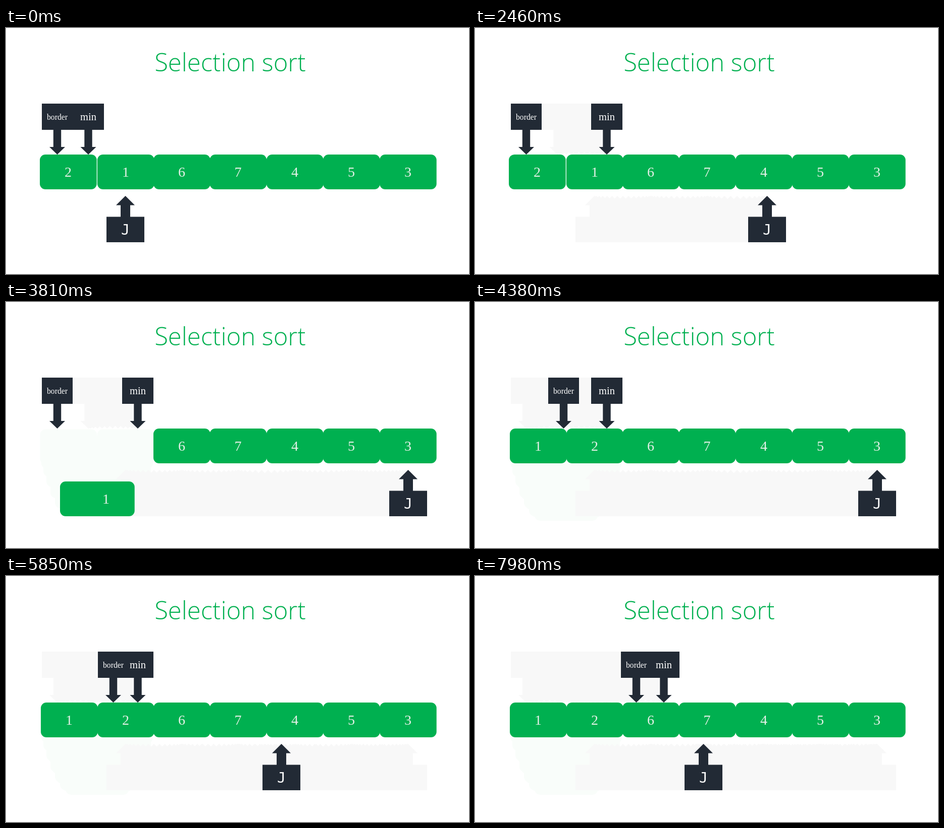
Animation of 917 by 488 pixels, one loop 8 s. Source, as an HTML page:

```html
<!DOCTYPE html>
<html lang="en">
<head>
<meta charset="utf-8">
<title>Selection sort</title>
<style>
  html, body { margin: 0; width: 100%; height: 100%; overflow: hidden; background: #fff; }
  svg { display: block; width: 100vw; height: 100vh; }
  text { text-anchor: middle; }
  .title { font: 300 49px "Open Sans", "Noto Sans", sans-serif; fill: #00b050; }
  .cell rect { fill: #00b050; }
  .cell text { font: 28px "Liberation Serif", "Times New Roman", serif; fill: #e5f1e9; }
  .label path { fill: #222a35; }
  .label text { font-family: "Liberation Serif", "Times New Roman", serif; fill: #fff; }
  #j text { font-family: "DejaVu Sans Mono", monospace; }
</style>
</head>
<body>
<svg id="stage" viewBox="0 0 917 488" xmlns="http://www.w3.org/2000/svg">
  <text class="title" x="444" y="86">Selection sort</text>
  <path id="cellTrail" fill="#f9fdfa"/>
  <path id="labelTrail" fill="#f8f8f8"/>
  <g id="cells"></g>
  <g id="min" class="label"><path/><text x="31" y="183" font-size="20.5">min</text></g>
  <g id="border" class="label"><path/><text x="30.5" y="182" font-size="15.7">border</text></g>
  <g id="j" class="label"><path/><text x="37.5" y="410" font-size="28">J</text></g>
</svg>
<script>
const LOOP = 8000, STEP = 30;
const NS = "http://www.w3.org/2000/svg";
const CELL_W = 112.7, CELL_TOP = 251, CELL_H = 69, RADIUS = 11, DIP = 115;
const $ = id => document.getElementById(id);

// Each move is [start time, duration, destination].
const tracks = {
  min: { from: 132, moves: [[510, 425, 230], [6950, 430, 343]] },
  border: { from: 71, moves: [[4100, 460, 182], [6950, 430, 289]] },
  j: { from: 199, moves: [
    [931, 475, 311], [1455, 475, 423], [1979, 410, 535], [2389, 475, 647], [2880, 600, 759],
    [4560, 410, 309], [5048, 475, 421], [5525, 475, 533], [6003, 464, 646], [6467, 475, 758],
    [7380, 390, 400], [7770, 880, 512]
  ] }
};
const swap = { from: 0, moves: [[3612, 490, 1]] };

function valueAt(track, t) {
  let v = track.from;
  for (const [start, dur, to] of track.moves) {
    if (t <= start) break;
    const p = Math.min(1, (t - start) / dur);
    v += (to - v) * (1 - Math.cos(Math.PI * p)) / 2;
  }
  return v;
}

// Outlines relative to the left edge of each label.
const downArrow = (x, w) => {
  const c = x + w / 2;
  return `M${x} 150h${w}v52H${c + 7.7}v34h7.8L${c} 251L${c - 15.5} 236h7.8v-34H${x}z`;
};
const upArrow = x =>
  `M${x} 374.5h28v-23h-9L${x + 37.5} 333L${x + 56} 351.5h-9v23h28V425h-75z`;
const cellShape = (x, y) => {
  const r = RADIUS, w = CELL_W - 2 * r, h = CELL_H - 2 * r, arc = `a${r} ${r} 0 0 1 `;
  return `M${x + r} ${y}h${w}${arc}${r} ${r}v${h}${arc}${-r} ${r}h${-w}` +
    `${arc}${-r} ${-r}v${-h}${arc}${r} ${-r}z`;
};
const outlines = {
  min: x => downArrow(x, 62),
  border: x => downArrow(x, 61),
  j: upArrow
};
for (const id in outlines) $(id).firstElementChild.setAttribute("d", outlines[id](0));

const lefts = [67, 181, 292, 403.5, 516, 628, 740];
function make(tag, attrs, parent) {
  const el = document.createElementNS(NS, tag);
  for (const k in attrs) el.setAttribute(k, attrs[k]);
  return parent.appendChild(el);
}
const cells = [2, 1, 6, 7, 4, 5, 3].map((n, i) => {
  const g = make("g", { class: "cell", transform: `translate(${lefts[i]} ${CELL_TOP})` }, $("cells"));
  make("rect", { width: CELL_W, height: CELL_H, rx: RADIUS }, g);
  make("text", { x: CELL_W / 2 - 0.3, y: 44 }, g).textContent = n;
  return g;
});

// Both swapped cells follow a parabola below the row.
function swapSpots(t) {
  const u = valueAt(swap, t), y = CELL_TOP + DIP * 4 * u * (1 - u);
  return [[67 + 114 * u, y], [181 - 112 * u, y]];
}

// The faint trail is the sum of all earlier positions.
function buildTrail(shapeAt) {
  const trail = [""];
  let last = "";
  for (let t = 0; t < LOOP; t += STEP) {
    const shape = shapeAt(t);
    trail.push(trail[trail.length - 1] + (shape === last ? "" : shape));
    last = shape;
  }
  return trail;
}
const labelTrails = Object.keys(outlines).map(id =>
  buildTrail(t => outlines[id](+valueAt(tracks[id], t).toFixed(1))));
const cellTrail = buildTrail(t => {
  const u = valueAt(swap, t);
  return u > 0 ? swapSpots(t).map(([x, y]) => cellShape(+x.toFixed(1), +y.toFixed(1))).join("") : "";
});

let shown = -1;
function draw(time) {
  const k = Math.floor((time % LOOP) / STEP);
  if (k === shown) return;
  shown = k;
  const t = k * STEP;
  for (const id in tracks)
    $(id).setAttribute("transform", `translate(${Math.round(valueAt(tracks[id], t))} 0)`);
  swapSpots(t).forEach(([x, y], i) =>
    cells[i].setAttribute("transform", `translate(${Math.round(x)} ${Math.round(y)})`));
  const moved = t > tracks.min.moves[0][0];
  $("labelTrail").setAttribute("d", moved ? labelTrails.map(trail => trail[k]).join("") : "");
  $("cellTrail").setAttribute("d", cellTrail[k]);
}

const begin = performance.now();
function tick() {
  draw(performance.now() - begin);
  requestAnimationFrame(tick);
}
draw(0);
requestAnimationFrame(tick);
</script>
</body>
</html>
```
